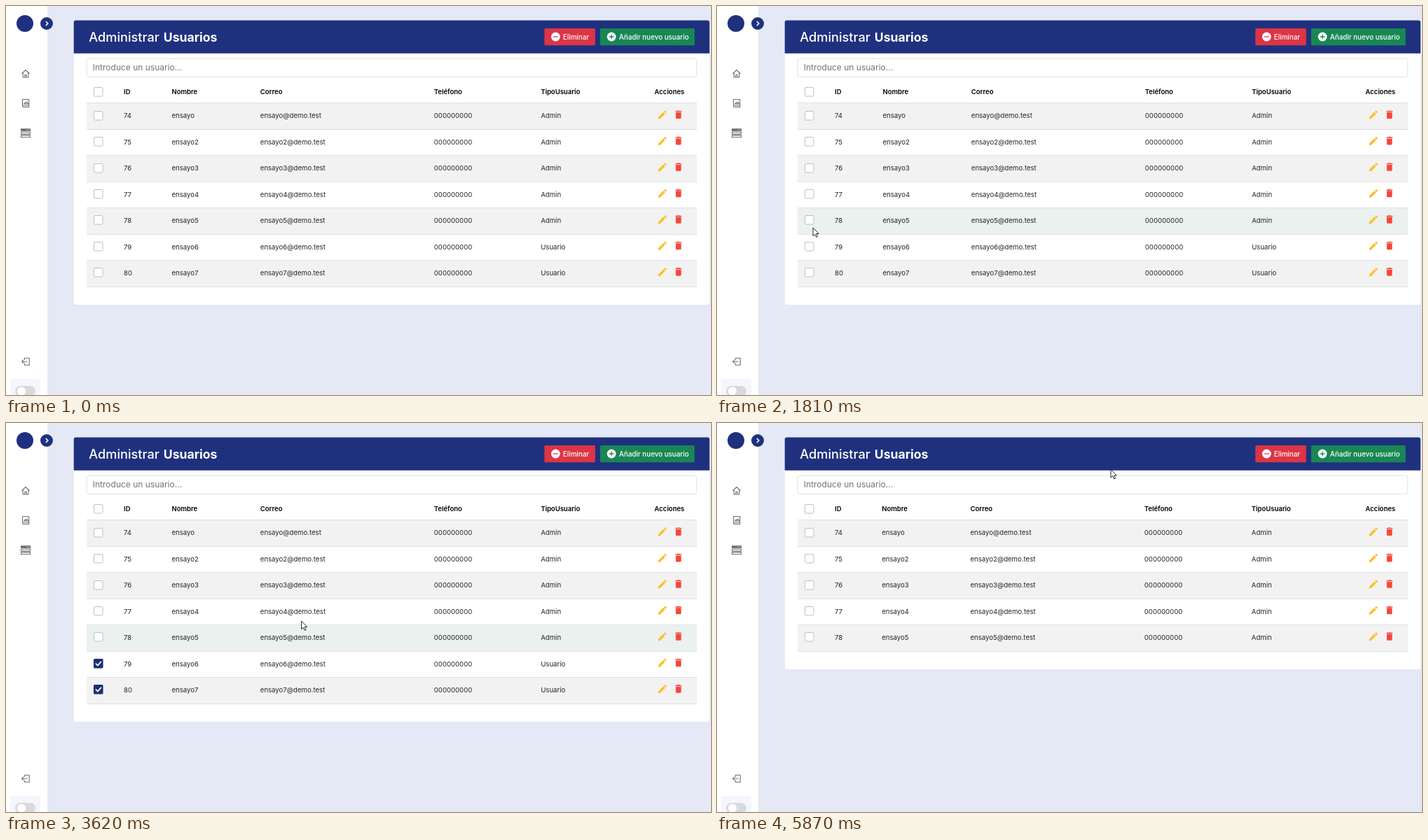
Write an HTML page that moves like this. It is 1006 px wide and 556 px high and loops after 6.07 s.

```html
<!DOCTYPE html>
<html lang="es">
<head>
<meta charset="utf-8">
<title>Administrar usuarios</title>
<style>
  html, body { margin: 0; width: 100%; height: 100%; overflow: hidden; background: #e4e9f5; }
  svg { display: block; width: 100vw; height: 100vh; }
  text { font-family: Inter, "Open Sans", sans-serif; font-size: 9.6px; fill: #212529; white-space: pre; }
  .head { font-size: 9.5px; font-weight: 600; fill: #000; }
  .title { font-size: 18.2px; font-weight: 500; fill: #fff; }
  .strong { font-size: 17.6px; font-weight: 700; }
  .hint { font-size: 12px; fill: #6c757d; }
  .button { font-size: 9.8px; font-weight: 500; fill: #fff; }
  .dialog text { font-family: "Open Sans", "Noto Sans", sans-serif; font-size: 8.75px; }
  .dialog .host { font-size: 10.6px; font-weight: 600; }
  .dialog .choice { font-weight: 600; text-anchor: middle; }
  .icon { fill: none; stroke: #707070; stroke-width: 1.1; stroke-linejoin: round; stroke-linecap: round; }
</style>
</head>
<body>
<svg id="stage" viewBox="0 0 1006 556" preserveAspectRatio="none"></svg>
<script>
const LOOP = 6070, NAVY = '#1f317e', BLUE = '#0a5ca8', LINE = '#dee2e6';
const ROW_TOP = 138.9, ROW_HEIGHT = 37.45, ROW_COUNT = 7;
const DIALOG_OPEN = 4390, DIALOG_CLOSE = 5730, REMOVED = 5870;
const CHECK_TIMES = { 5: 2650, 6: 3280 };
const STEP = 70, STEP_BASES = [0, 690, 3480, 4780];

// Pointer tip: time, x, y
const POINTER = [
  [70, 986, 543], [200, 860, 430], [340, 650, 300], [480, 520, 235], [620, 455, 216],
  [760, 444, 214], [900, 415, 204], [1040, 340, 207], [1250, 210, 226], [1390, 174, 251.5],
  [1600, 145, 290], [1810, 137, 317], [1950, 134, 318], [2300, 133, 338], [2510, 133, 345],
  [2720, 133, 346], [3000, 124, 374], [3140, 119, 379], [3210, 128, 380], [3480, 130, 380],
  [3550, 275, 330], [3620, 421.5, 283], [3760, 640, 150], [3900, 745, 85], [4040, 782, 59],
  [4250, 786, 48], [4390, 786, 50], [4740, 786, 50], [4920, 715, 61], [5060, 610, 70],
  [5200, 567.5, 63], [5330, 567, 63], [5400, 562, 66.5]
];

const PENCIL = 'M3 17.25V21h3.75L17.81 9.94l-3.75-3.75zM20.71 7.04a1 1 0 000-1.41l-2.34-2.34a1 1 0 00-1.41 0l-1.83 1.83 3.75 3.75z';
const TRASH = 'M6 19c0 1.1.9 2 2 2h8c1.1 0 2-.9 2-2V7H6zM19 4h-3.5l-1-1h-5l-1 1H5v2h14z';

const rect = (x, y, w, h, fill, more = '') =>
  `<rect x="${x}" y="${y}" width="${w}" height="${h}" fill="${fill}" ${more}/>`;
const text = (x, y, value, cls = '', more = '') =>
  `<text x="${x}" y="${y}" class="${cls}" ${more}>${value}</text>`;
const path = (d, more = '') => `<path d="${d}" ${more}/>`;
const rule = y => rect(115, y, 871, 1, LINE);
const rowEdge = i => Math.floor(ROW_TOP + i * ROW_HEIGHT);
const box = y => rect(125.5, y - 6.5, 12.5, 12.5, '#fff', 'rx="1.5" stroke="#bfbfbf"');
const tick = (y, id) => `<g id="${id}">${rect(125, y - 7, 13.5, 13.5, '#1b2f72', 'rx="1.5"')}
  ${path(`M128.3 ${y}l2.5 2.6 4.6-5.2`, 'fill="none" stroke="#fff" stroke-width="1.7" stroke-linecap="round" stroke-linejoin="round"')}</g>`;

function cells(values, y, cls = '') {
  const [id, name, mail, phone, kind] = values;
  return text(168, y, id, cls) + text(236.5, y, name, cls, 'data-shift="1.3"') +
    text(362.8, y, mail, cls, 'data-shift="1.3"') + text(610.8, y, phone, cls, 'data-shift="1"') +
    text(763.2, y, kind, cls, 'data-shift="0.4"');
}

function row(i) {
  const top = rowEdge(i) + 1, bottom = rowEdge(i + 1);
  const mid = ROW_TOP + i * ROW_HEIGHT + 18.2, boxY = Math.floor(mid);
  const name = 'ensayo' + (i ? i + 1 : '');
  const values = [74 + i, name, name + '@demo.test', '000000000', i < 5 ? 'Admin' : 'Usuario'];
  return `<g id="row${i}">
    ${rect(115, top, 871, bottom - top, '#fff', `id="fill${i}"`)}
    ${rule(bottom)}
    ${box(boxY)}
    ${i in CHECK_TIMES ? tick(boxY, 'tick' + i) : ''}
    ${cells(values, mid + 3.3)}
    ${path(PENCIL, `fill="#fdc029" transform="translate(928.7 ${mid - 9.7}) scale(.67)"`)}
    ${path(TRASH, `fill="#f5473b" transform="translate(951.9 ${mid - 9.6}) scale(.64)"`)}
  </g>`;
}

const sidebar = () => rect(0, 0, 59, 556, '#fff') +
  `<circle cx="27" cy="25" r="12" fill="${NAVY}"/>
   <circle cx="58" cy="25" r="9" fill="${NAVY}"/>` +
  path('M56.8 22l3 3-3 3', 'fill="none" stroke="#fff" stroke-width="1.6"') +
  `<g class="icon">
    ${path('M22.8 96.5L28 91.5l5.2 5M24.2 95.5v6.5h7.6v-6.5M26.8 102v-3.4h2.4v3.4')}
    ${path('M23.5 133.5h9.2v11h-8a1.4 1.4 0 01-1.2-1.4zM23.5 142.2h9M25.5 140l2-2.2 1.2 1 1.3-1.8 1.7 3z')}
    <rect x="21.5" y="175.7" width="13" height="2.8" fill="#707070"/>
    <rect x="21.5" y="180.3" width="13" height="2.8"/>
    <rect x="21.5" y="184.9" width="13" height="2.8"/>
    ${path('M26.5 505.5v-2.3h6.7v10h-6.7v-2.3M30 508.2h-7.3M25 505.8l-2.4 2.4 2.4 2.4')}
  </g>` +
  path('M30 177.1h.1M32.5 177.1h.1', 'stroke="#fff" stroke-width="1" stroke-linecap="square"') +
  rect(6, 533, 43, 40, '#f5f5fd', 'rx="4"') +
  rect(13, 543, 29, 15, '#d9dadd', 'rx="7.5"') +
  '<circle cx="22" cy="550.5" r="6" fill="#fff"/>';

const roundIcon = (x, color, d) => `<circle cx="${x}" cy="44" r="6.4" fill="#fff"/>` +
  path(d, `stroke="${color}" stroke-width="1.3"`);

const panel = () => rect(96.7, 20.6, 907.2, 406.4, '#fff', 'id="card" rx="3"') +
  path('M96.7 67.7V23.6q0-3 3-3h901.2q3 0 3 3v44.1z', `fill="${NAVY}"`) +
  text(118.3, 51.2, 'Administrar', 'title') + text(224.8, 51.2, 'Usuarios', 'title strong') +
  rect(768.3, 32, 72.4, 24.3, '#dc3545', 'id="remove" rx="1.5"') +
  roundIcon(784.3, '#dc3545', 'M781 44h6.6') + text(794.8, 47.6, 'Eliminar', 'button') +
  rect(847.8, 32, 134.8, 24.3, '#198754', 'rx="1.5"') +
  roundIcon(864, '#198754', 'M860.7 44h6.6M864 40.7v6.6') +
  text(874.8, 47.6, 'Añadir nuevo usuario', 'button') +
  rect(115.2, 75.2, 870.4, 26.4, '#fff', `rx="3.5" stroke="${LINE}"`) +
  text(123.8, 92.3, 'Introduce un usuario...', 'hint') +
  box(123) + cells(['ID', 'Nombre', 'Correo', 'Teléfono', 'TipoUsuario'], 126.3, 'head') +
  text(925.3, 126.3, 'Acciones', 'head') + rule(rowEdge(0)) +
  Array.from({ length: ROW_COUNT }, (_, i) => row(i)).join('');

function dialog() {
  const blur = ['#e9e9e9', '#dedede', '#e4e4e4', '#d8d8d8', '#e2e2e2', '#dadada', '#e8e8e8']
    .map((c, i) => rect(363.5 + i * 9.7, 12, 9.8, 12.5, c)).join('');
  return `<g id="dialog" class="dialog">
    ${rect(349, -12, 320, 113, '#fff', 'rx="8" stroke="#c4c7cc" stroke-width=".8" filter="url(#shadow)"')}
    ${blur}
    ${text(434, 23.3, 'dice', 'host')}
    ${text(363.8, 44.3, '¿Estás seguro que quieres eliminar este usuario?')}
    ${rect(528.4, 57.4, 63, 30.2, '#fff', `rx="15.1" stroke="${BLUE}" stroke-width="1.6"`)}
    ${rect(530.3, 59.3, 59.2, 26.4, BLUE, 'rx="13.2"')}
    ${text(560, 76, 'Aceptar', 'choice', 'style="fill:#fff"')}
    ${rect(595.5, 59.5, 59, 26.5, '#fff', 'rx="13.2" stroke="#c3d9ef"')}
    ${text(625, 76, 'Cancelar', 'choice', `style="fill:${BLUE}"`)}
  </g>`;
}

const stage = document.getElementById('stage');
stage.innerHTML = `<defs><filter id="shadow" x="-5%" y="-10%" width="110%" height="125%">
    <feDropShadow dx="0" dy="1" stdDeviation="1.6" flood-opacity=".3"/></filter></defs>` +
  sidebar() + panel() + dialog() +
  path('M0 0V11.7L2.7 9.2 4.6 13.4 6.5 12.6 4.6 8.5H8.3Z',
    'id="pointer" fill="#fff" stroke="#111" stroke-width=".9" stroke-linejoin="round"');

const get = id => document.getElementById(id);
const show = (id, on) => get(id).setAttribute('visibility', on ? 'visible' : 'hidden');
const shifting = [...stage.querySelectorAll('[data-shift]')];

function pointerAt(t) {
  const next = POINTER.findIndex(key => key[0] > t);
  if (next === 0) return POINTER[0].slice(1);
  if (next < 0) return POINTER[POINTER.length - 1].slice(1);
  const [t0, x0, y0] = POINTER[next - 1], [t1, x1, y1] = POINTER[next];
  const k = (t - t0) / (t1 - t0);
  return [x0 + (x1 - x0) * k, y0 + (y1 - y0) * k];
}

function stepTime(t) {
  const base = STEP_BASES.filter(b => b <= t).pop();
  return base + Math.floor((t - base) / STEP) * STEP;
}

function draw(t) {
  const held = stepTime(t), removed = t >= REMOVED;
  const asking = t >= DIALOG_OPEN && t < DIALOG_CLOSE;
  const [x, y] = pointerAt(held);
  // Row highlighting trails the pointer slightly
  const [hoverX, hoverY] = pointerAt(held - 25);
  const inTable = t >= STEP && !asking && hoverX >= 115 && hoverX < 986;
  const hovered = inTable ? Math.floor((hoverY - ROW_TOP) / ROW_HEIGHT) : -1;

  for (let i = 0; i < ROW_COUNT; i++) {
    get('row' + i).style.display = removed && i > 4 ? 'none' : '';
    get('fill' + i).setAttribute('fill', i === hovered ? '#eaf1ee' : i % 2 ? '#fff' : '#f2f2f2');
  }
  for (const i in CHECK_TIMES) get('tick' + i).style.display = t >= CHECK_TIMES[i] ? '' : 'none';
  for (const el of shifting) {
    el.setAttribute('transform', `translate(${removed ? -el.dataset.shift : 0} 0)`);
  }
  get('card').setAttribute('height', removed ? 331.4 : 406.4);
  get('remove').setAttribute('fill', t >= 4110 && !removed ? '#d33545' : '#dc3545');
  show('dialog', asking);
  show('pointer', t >= STEP);
  get('pointer').setAttribute('transform', `translate(${x} ${y})`);
}

const start = performance.now();
function animate() {
  draw((performance.now() - start) % LOOP);
  requestAnimationFrame(animate);
}
animate();
</script>
</body>
</html>
```
